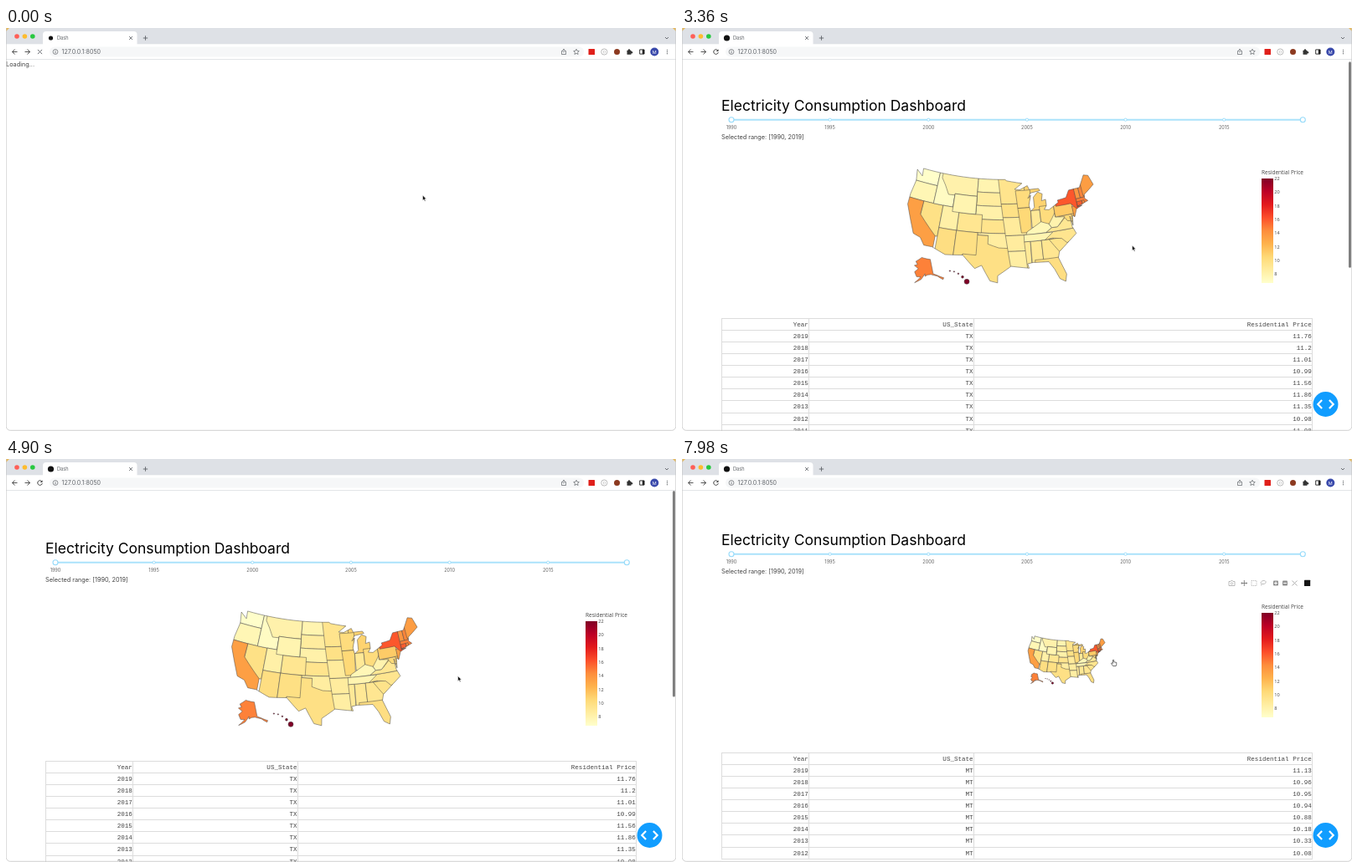
Write an HTML page with a canvas that moves like this. It is 800 px wide and 482 px high and loops after 8 s.

```html
<!DOCTYPE html>
<html lang="en">
<head>
<meta charset="utf-8">
<title>Electricity Consumption Dashboard</title>
<style>
html, body { margin: 0; width: 100%; height: 100%; overflow: hidden; background: #fff; }
canvas { display: block; width: 800px; height: 482px; }
</style>
</head>
<body>
<canvas id="stage"></canvas>
<script>
const W = 800, H = 482, LOOP = 8000, STEP = 70;
const canvas = document.getElementById('stage');
const ctx = canvas.getContext('2d');
const density = window.devicePixelRatio || 1;
canvas.width = W * density;
canvas.height = H * density;

const SANS = 'Inter, sans-serif', PLOT = '"Open Sans", sans-serif';
const ARIAL = '"Liberation Sans", sans-serif', MONO = '"Liberation Mono", monospace';

// ---------- drawing helpers ----------
function text(str, x, y, size, family, color = '#444', align = 'left') {
  ctx.font = `${size}px ${family}`;
  ctx.fillStyle = color;
  ctx.textAlign = align;
  ctx.fillText(str, x, y);
}
function box(x, y, w, h, color, radius = 0) {
  ctx.beginPath();
  ctx.roundRect(x, y, w, h, radius);
  ctx.fillStyle = color;
  ctx.fill();
}
function disc(x, y, r, fill, stroke, width = 1) {
  ctx.beginPath();
  ctx.arc(x, y, r, 0, 7);
  if (fill) { ctx.fillStyle = fill; ctx.fill(); }
  if (stroke) { ctx.strokeStyle = stroke; ctx.lineWidth = width; ctx.stroke(); }
}
// Strokes (and optionally fills) an SVG path placed at x, y.
function icon(d, x, y, color, width = 0.9, fill) {
  const path = new Path2D(d);
  ctx.save();
  ctx.translate(x, y);
  if (fill) { ctx.fillStyle = fill; ctx.fill(path); }
  if (width) { ctx.strokeStyle = color; ctx.lineWidth = width; ctx.stroke(path); }
  ctx.restore();
}
// Eased value of keyframes [time, ...values].
function track(keys, t, ease = u => u * u * (3 - 2 * u)) {
  const next = keys.findIndex(k => k[0] > t);
  if (next < 0) return keys[keys.length - 1].slice(1);
  if (next === 0) return keys[0].slice(1);
  const a = keys[next - 1], b = keys[next], u = ease((t - a[0]) / (b[0] - a[0]));
  return a.slice(1).map((v, i) => v + (b[i + 1] - v) * u);
}

// ---------- map: Albers equal-area, points are degrees west and north ----------
const RAD = Math.PI / 180, MAP_X = 380.2, MAP_Y = 240.6, MAP_K = 307;

function albers(south, north, meridian, centerLon, centerLat, scale, tx, ty) {
  const s = Math.sin(south * RAD), n = (s + Math.sin(north * RAD)) / 2;
  const c = 1 - s * s + 2 * n * s;
  const raw = (west, lat) => {
    const rho = Math.sqrt(c - 2 * n * Math.sin(lat * RAD)) / n;
    const angle = n * (meridian - west) * RAD;
    return [rho * Math.sin(angle), rho * Math.cos(angle)];
  };
  const [x0, y0] = raw(centerLon, centerLat);
  return (west, lat) => {
    const [x, y] = raw(west, lat);
    return [tx + scale * (x - x0), ty + scale * (y - y0)];
  };
}
const mainland = albers(29.5, 45.5, 96, 96.6, 38.7, MAP_K, MAP_X, MAP_Y);
const alaska = albers(55, 65, 154, 156, 58.5, MAP_K * 0.35, MAP_X - 0.307 * MAP_K, MAP_Y + 0.201 * MAP_K);
const hawaii = albers(8, 18, 157, 160, 19.9, MAP_K, MAP_X - 0.205 * MAP_K, MAP_Y + 0.212 * MAP_K);

// Edges are subdivided so that parallels come out curved.
function polygon(points, project = mainland) {
  const path = new Path2D();
  points.forEach(([lon, lat], i) => {
    const [lon2, lat2] = points[(i + 1) % points.length];
    const parts = Math.ceil(Math.abs(lon2 - lon) / 2) || 1;
    for (let j = 0; j < parts; j++) {
      const u = j / parts;
      path.lineTo(...project(lon + (lon2 - lon) * u, lat + (lat2 - lat) * u));
    }
  });
  path.closePath();
  return path;
}
const parse = str => str.split(' ').map(pair => pair.split(',').map(Number));

const RAMP = ['#ffffcc', '#ffeda0', '#fed976', '#feb24c', '#fd8d3c', '#fc4e2a', '#e31a1c', '#bd0026', '#800026'];
const LOW = 6.7, HIGH = 22;
function priceColor(price) {
  const pos = Math.min(0.9999, Math.max(0, (price - LOW) / (HIGH - LOW))) * 8, i = Math.floor(pos);
  const channel = (hex, k) => parseInt(hex.slice(1 + 2 * k, 3 + 2 * k), 16);
  const mix = k => Math.round(channel(RAMP[i], k) + (channel(RAMP[i + 1], k) - channel(RAMP[i], k)) * (pos - i));
  return `rgb(${mix(0)},${mix(1)},${mix(2)})`;
}

const northCoast = '124.7,48.4 122.5,47.3 122.8,49 95.2,49 94.6,48.7 89.6,48 92.1,46.75 90.4,46.6 87.9,47.4 87.4,46.5 84.4,46.5 84,46 87.1,45.7 88,44.55 87.1,45.2 87.9,43 87.5,41.65';
const lakeCoast = '86.3,42.4 86.3,44.7 84.8,45.75 83.4,45.2 83.9,43.7 82.6,43.9 82.6,42.5 83.4,41.7 82,41.5 78.9,42.8 79,43.3 76.3,43.5 75,45 71.5,45 70.2,46.4 69.2,47.45 67.8,47.1 67,44.8';
const eastCoast = '70.6,43.2 70.8,42.4 70,41.7 73.7,40.95 72,41.05 73.9,40.55 74.9,38.95 75.5,39.4 75.9,37.2 76.3,39.3 76.2,36.9 75.5,35.3 77.9,33.9 80.9,32 81.4,30.7 80,26.8 80.5,25.2 81.8,26 82.8,28.3 84,30.1 88,30.3';
const southWest = '89.5,30.1 89.2,29.1 93.8,29.7 97.2,27.6 97.2,26 99.1,26.4 101.4,29.8 103.1,29 106.5,31.75 111.1,31.33 114.8,32.5 117.1,32.5 118.5,34 120.6,34.5 122.5,37.5 124.4,40.4 124.5,42.8 124,46';
const outline = polygon(parse([northCoast, lakeCoast, eastCoast, southWest].join(' ')));

// Later states cover earlier ones; the coast clips whatever reaches past it.
const states = [];
const add = (price, points) => states.push({ color: priceColor(price), path: polygon(points) });
const shape = (price, str) => add(price, parse(str));
// Four-sided state; its sides lean from their place at 49°N to the one at 29°N.
function block(price, north, south, west, east, westLow = west, eastLow = east) {
  const side = (top, low, lat) => [top + (low - top) * (49 - lat) / 20, lat];
  add(price, [side(west, westLow, north), side(east, eastLow, north), side(east, eastLow, south), side(west, westLow, south)]);
}
// States stacked from north to south, each as "price,southern edge".
function column(north, stack, ...sides) {
  for (const [price, south] of parse(stack)) {
    block(price, north, south, ...sides);
    north = south;
  }
}
column(50, '6.8,46 7.7,42', 125, 117);
block(9.8, 42, 35, 120, 114);
shape(13.4, '125,42 120,42 120,39 114.6,35 114.6,32 125,32');
block(7.1, 50, 42, 117, 111);
shape(8.15, '116,50 104,50 104,45 113,44.6 114.5,46.5 116,48');
column(50, '7.9,46 8.7,43 8.2,40 9.5,37', 104, 95);
block(9.86, 36.5, 25, 106.6, 93.5);
shape(8.6, '103,37 94.5,37 94.5,33.7 97,33.8 100,34.6 100,36.5 103,36.5');
block(7.9, 45, 41, 111, 104);
block(9.3, 41, 37, 109, 102);
column(42, '8.3,37 10,31', 114, 109);
block(7.9, 45, 41, 111, 104);
shape(9.9, '109,37 103,37 103,32 106.6,32 106.6,31 109,31');
block(10.8, 48, 41.75, 90.4, 82);
column(50, '9.5,43.5 9.8,40.5 8.8,36.5 8.7,33 8.5,28', 97.4, 89, 93.8, 89);
column(46.4, '10.2,42.5 10.5,37', 92.2, 87, 89.6, 88.3);
block(9, 35, 29, 91, 88.2, 89.6, 88.4);
block(9, 41.75, 38, 87.5, 84.8);
block(9.1, 35, 29, 88.3, 85.3);
block(10.2, 42.5, 38.4, 84.8, 80.5);
shape(7.6, '89.4,36.5 89,37.2 84.8,39.1 82.6,38.4 82,37.5 83.7,36.6');
block(7.9, 36.55, 35, 90, 82);
block(9.3, 35, 30.6, 85.3, 80);
shape(9.6, '83.2,35 78,35 78,32 80.8,31.9');
shape(9.4, '84.3,35 81.7,36.6 75,36.6 75,34 78.5,33.7 79.7,34.8 82.3,35.2');
block(10, 30.8, 24, 87.5, 79);
block(10.4, 39.72, 38, 79.5, 75);
shape(9.2, '83.7,36.6 82,37.5 80.3,37.5 77.8,39.2 77.2,38.4 75,38 75,36.6');
shape(8, '82.6,38.4 80.5,40.6 80.5,39.7 77.8,39.4 80.3,37.5 82,37.5');
block(11, 39.8, 38.45, 75.75, 75);
block(11.2, 42.3, 39.72, 80.5, 75);
block(13.3, 41.3, 38.7, 75.1, 73.5);
shape(16, '79.8,42 79.8,44 75,45.1 73.3,45.1 73.4,41.1 71.5,41.1 73.5,40.4 74,40.7 75.3,42');
column(45.4, '13.9,42.7', 73.4, 72);
block(14.6, 45.4, 42.7, 72, 70.6);
block(13.5, 48, 43, 71, 66);
block(14.8, 42.73, 41, 73.4, 69);
block(15.8, 42.05, 41.15, 73.4, 71.8);
block(14.4, 42.05, 41.15, 71.8, 71.1);

const hawaiiPath = new Path2D();
for (let i = 0; i < 5; i++) {
  const [x, y] = hawaii(159.5 - i, 22 - 0.15 * i * i), r = 0.7 + 0.009 * i ** 4;
  hawaiiPath.moveTo(x + r, y);
  hawaiiPath.arc(x, y, r, 0, 7);
}
const islands = [
  { color: priceColor(14.7), path: polygon(parse('141,69.6 141,60.2 137,58.9 130,55.9 131.5,55 136.6,58.2 144,60 148.3,60 151.7,59.2 151.5,60.8 156.5,57.2 163.5,54.8 157,58.8 162,58.7 165.5,61.6 161,64 167.5,65.6 163,66.5 166.4,68.4 156.6,71.3'), alaska) },
  { color: priceColor(22), path: hawaiiPath }
];

function drawMap(zoom) {
  ctx.save();
  // Zoom keeps the point under the pointer in place.
  ctx.translate(...ZOOM_AT);
  ctx.scale(zoom, zoom);
  ctx.translate(-ZOOM_AT[0], -ZOOM_AT[1]);
  ctx.lineWidth = 0.5 / zoom;
  ctx.lineJoin = 'round';
  ctx.strokeStyle = '#444';
  const paint = ({ color, path }) => { ctx.fillStyle = color; ctx.fill(path); ctx.stroke(path); };
  ctx.save();
  ctx.clip(outline);
  states.forEach(paint);
  ctx.restore();
  ctx.stroke(outline);
  islands.forEach(paint);
  ctx.restore();
}

// ---------- page ----------
const years = (name, prices) => prices.split(' ').map((price, i) => [2019 - i, name, price]);
const TABLES = {
  all: 'AK 22.92,AL 12.53,AR 9.8,AZ 12.43,CA 19.15,CO 12.18,CT 21.87,DC 12.98'.split(',').map(s => [2019, ...s.split(' ')]),
  TX: years('TX', '11.76 11.2 11.01 10.99 11.56 11.86 11.35 10.98 11.08 11.6 12.38 13.03 12.34 12.86 10.93 9.73 9.16 8.05 8.86 7.96 7.55 7.65 7.82 7.77 7.71 8.08 8 7.74 7.57 7.2'),
  MT: years('MT', '11.13 10.96 10.95 10.94 10.88 10.18 10.33 10.08')
};
const ROW = 14.07, TABLE_TOP = 351, PAGE_TOP = 38, MAX_SCROLL = 354;

function drawTable(rows) {
  const line = '#dcdcdc', height = ROW * (rows.length + 1);
  [['Year', 'US_State', 'Residential Price'], ...rows].forEach((cells, i) => {
    const y = Math.round(TABLE_TOP + i * ROW);
    box(47, y, 706, 1, line);
    [150.8, 347.6, 751.8].forEach((x, c) => text(cells[c], x, y + 10, 7.55, MONO, '#444', 'right'));
  });
  box(47, Math.round(TABLE_TOP + height), 706, 1, line);
  for (const x of [47, 151, 348, 752]) box(x, TABLE_TOP, 1, height, line);
}

function drawSlider() {
  const x0 = 59, x1 = 741.3, y = 113.7;
  box(x0, y - 1, x1 - x0, 2, '#abe2fb', 1);
  for (let year = 1990; year < 2019; year += 5) {
    const x = x0 + (x1 - x0) * (year - 1990) / 29;
    disc(x, y, 1.6, '#fff', '#96dbfa', 0.9);
    text(year, x, 125, 5.6, SANS, '#666', 'center');
  }
  for (const x of [x0, x1]) disc(x, y, 3, '#fff', '#96dbfa', 1.1);
}

function drawColorBar() {
  const x = 692, top = 184, bottom = 309;
  text('Residential Price', x, 179.3, 6.5, PLOT);
  const fade = ctx.createLinearGradient(0, bottom, 0, top);
  RAMP.forEach((color, i) => fade.addColorStop(i / 8, color));
  box(x, top, 14, bottom - top, fade);
  for (let v = 8; v <= 22; v += 2) text(v, 707.3, top + (22 - v) * 8.17 + 2, 5.6, PLOT);
}

function drawModeBar() {
  const soft = '#b4b4b4', strong = '#777', y = 148.5;
  icon('M-3.5 -2H-1.5L-.8 -3H.8L1.5 -2H3.5V3H-3.5ZM1.2 .4A1.2 1.2 0 1 1 1.2 .3', 656.5, y, soft);
  icon('M-3.5 0H3.5M0 -3.5V3.5M-2.4 -1L-3.5 0L-2.4 1M2.4 -1L3.5 0L2.4 1', 671.3, y, strong);
  ctx.setLineDash([1.2, 0.9]);
  icon('M-3 -3H3V3H-3Z', 683, y, soft);
  ctx.setLineDash([]);
  icon('M-2 1C-4 -1 -2 -3 1 -3C4 -3 4 1 0 1C-2 1 -3 1 -2 3', 694, y, soft);
  box(706, y - 3, 6, 6, '#929292', 1);
  icon('M-2 0H2M0 -2V2', 709, y, '#fff', 1);
  box(717, y - 3, 6, 6, '#929292', 1);
  icon('M-2 0H2', 720, y, '#fff', 1);
  icon('M-3 -3L3 3M3 -3L-3 3', 731.5, y, '#aaa');
  box(743, y - 3.7, 7.2, 7.2, '#141414', 0.5);
}

function drawTooltip(x, y, name, price) {
  const label = `Residential Price=${price}`;
  ctx.font = `6px ${ARIAL}`;
  const width = ctx.measureText(label).width + 3;
  icon(`M0 0L5 -3V-8.3H${5 + width}V8.3H5V3Z`, x, y, '', 0, '#393d40');
  text(`US_State=${name}`, x + 6.3, y - 1.8, 6, ARIAL, '#fff');
  text(label, x + 6.3, y + 6.2, 6, ARIAL, '#fff');
}

// ---------- browser window ----------
function drawChrome(loading) {
  const ink = '#5f6368', cross = 'M-2 -2L2 2M2 -2L-2 2';
  box(0, 0, W, 19.5, '#dee1e6');
  icon('M0 0H4L0 4Z', 0, 0, '', 0, '#e8b95a');
  icon('M0 0H-4L0 4Z', W, 0, '', 0, '#e8b95a');
  ['#ff5f57', '#febc2e', '#28c840'].forEach((c, i) => disc(13 + 9.4 * i, 10, 2.8, c));
  box(44, 4, 112.5, 16, '#fff', [4, 4, 0, 0]);
  disc(53.5, 12, loading ? 2.6 : 3.6, '#111');
  text('Dash', 61, 14, 5.6, SANS, ink);
  icon(cross, 149, 12, ink, 0.8);
  icon('M-2.7 0H2.7M0 -2.7V2.7', 166.5, 12, ink);
  icon('M-2 -1L0 1L2 -1', 789, 12, ink);

  box(0, 19.5, W, 18, '#fff');
  box(0, 37, W, 0.7, '#dadce0');
  box(52, 22.5, 638, 12, '#f6f7f8', 6);
  icon('M3 0H-3M0 -3L-3 0L0 3', 10.5, 28.5, '#444');
  icon('M-3 0H3M0 -3L3 0L0 3', 25.5, 28.5, '#444');
  if (loading) icon('M-2.6 -2.6L2.6 2.6M2.6 -2.6L-2.6 2.6', 40.5, 28.5, ink);
  else {
    icon('M2.2 -1.8A2.8 2.8 0 1 0 2.8 .6', 40.5, 28.5, '#444', 1);
    icon('M3 -3.3V-.6H.3Z', 40.5, 28.5, '', 0, '#444');
  }
  disc(59, 28.5, 2.9, null, ink, 0.7);
  icon('M0 -.4V1.7M0 -1.7V-1', 59, 28.5, ink, 0.8);
  text('127.0.0.1:8050', 66.5, 30.9, 7.1, SANS, ink);

  icon('M-1 -1H-2.5V3H2.5V-1H1M0 1V-3.4M-1.4 -2L0 -3.4L1.4 -2', 666, 28.5, ink, 0.7);
  icon('M0 -3.3L1 -1.1L3.3 -.9L1.6 .7L2.1 3L0 1.8L-2.1 3L-1.6 .7L-3.3 -.9L-1 -1.1Z', 681, 28.5, ink, 0.7);
  box(695.5, 25, 7.5, 7, '#e0201b', 0.5);
  disc(714.3, 28.5, 3.6, null, '#aaa', 0.8);
  text('{}', 714.3, 30.2, 4.5, SANS, '#999', 'center');
  disc(729.5, 28.5, 3.5, '#8c3a20');
  box(741.5, 26.8, 5, 5, '#333', 0.5);
  disc(744, 26.4, 1.2, '#333');
  disc(747, 29.2, 1.2, '#333');
  icon('M-2.6 -2.6H2.6V2.6H-2.6Z', 759.3, 28.5, '#222');
  box(759.8, 25.9, 2.5, 5.2, '#222');
  disc(774.3, 28.5, 5, '#3949ab');
  text('M', 774.3, 30.5, 5.4, SANS, '#fff', 'center');
  for (const dy of [-2.2, 0, 2.2]) disc(789.5, 28.5 + dy, 0.65, ink);
}

function drawPointer(x, y, hand) {
  if (hand) icon('M-.6 .5V4.6L-1.8 3.8Q-2.8 4 -2.2 5L-.4 7.6H3.2Q4 5.5 3.8 3.4L.7 2.8V.5Q0 -.4 -.6 .5Z', x, y, '#333', 0.7, '#fff');
  else icon('M0 0V6.2L1.5 4.9L2.5 7.2L3.5 6.8L2.5 4.6H4.4Z', x, y, '#fff', 0.5, '#111');
}

// ---------- timeline ----------
const ZOOM_AT = [515, 240];
const POINTER = [[1100, 497.5, 200], [2030, 355.5, 279], [2590, 355.5, 279], [3200, 537.5, 260],
  [3920, 537.5, 260], [4340, 539.5, 259.5], [5110, 539.5, 259.5], [5740, 337.5, 194], [6370, 337.5, 194], [6860, ...ZOOM_AT]];
const SCROLL = [[3350, 0], [3920, 227], [4300, MAX_SCROLL], [4480, MAX_SCROLL], [4830, -9], [4900, -10], [5250, 0]];
const ZOOM = [[7000, 1], [7900, 0.415]];
const within = (t, from, to) => t >= from && t < to;

function draw(t) {
  const loading = t < 560;
  const scroll = Math.round(track(SCROLL, t, u => u)[0]);
  ctx.setTransform(density, 0, 0, density, 0, 0);
  box(0, 0, W, H, '#fff');

  if (loading) text('Loading...', 0, 46, 7.3, SANS);
  else {
    ctx.save();
    ctx.translate(0, -scroll);
    text('Electricity Consumption Dashboard', 47, 102.5, 17.5, SANS, '#000');
    drawSlider();
    text('Selected range: [1990, 2019]', 47, 137, 7.3, SANS);
    drawColorBar();
    drawMap(track(ZOOM, t)[0]);
    if (within(t, 1120, 3350) || t >= 5180) drawModeBar();
    if (within(t, 2030, 2660)) drawTooltip(366, 279.3, 'TX', '9.85933');
    if (within(t, 5670, 6440)) drawTooltip(331, 192.5, 'MT', '8.145667');
    drawTable(t < 2520 ? TABLES.all : t < 6090 ? TABLES.TX : TABLES.MT);
    ctx.restore();
    disc(768.5, 450, 15, '#119dff');
    icon('M-4.4 -5L-9.2 0L-4.4 5M4.4 -5L9.2 0L4.4 5', 768.5, 450, '#fff', 2.2);
    if (within(t, 3350, 5460)) {
      const thumb = PAGE_TOP + Math.max(0, scroll) * 197 / MAX_SCROLL;
      box(796, thumb, 3, 246.5, '#808080', 1.5);
    }
  }
  drawChrome(loading);
  ctx.beginPath();
  ctx.roundRect(0.2, -10, W - 0.4, H + 9.3, 5);
  ctx.strokeStyle = '#c4c4c4';
  ctx.lineWidth = 0.8;
  ctx.stroke();
  drawPointer(...track(POINTER, t), t >= 6790);
}

function tick() {
  const t = performance.now() % LOOP;
  draw(t - t % STEP);
  requestAnimationFrame(tick);
}
tick();
</script>
</body>
</html>
```
